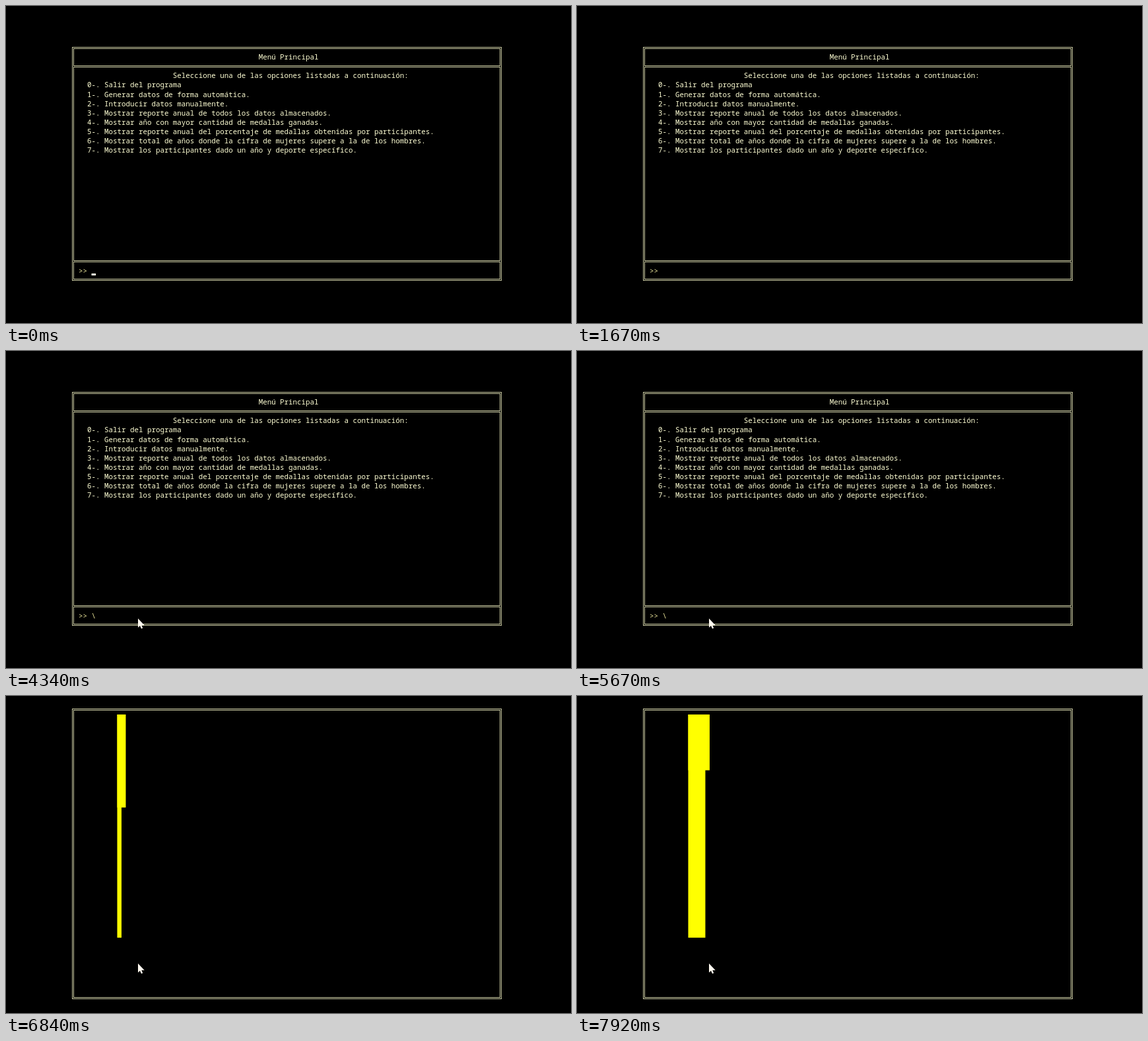
Animation of 856x480 px, one loop 8 s. Source, as an HTML page with a canvas:

```html
<!DOCTYPE html>
<html lang="es">
<head>
<meta charset="utf-8">
<title>Menú Principal</title>
<style>
  html, body { margin: 0; width: 100%; height: 100%; overflow: hidden; background: #000; }
  canvas { display: block; }
</style>
</head>
<body>
<canvas id="stage" width="856" height="480"></canvas>
<script>
const ctx = document.getElementById('stage').getContext('2d');

const LOOP = 8000, FRAMES = 96;
const CELL_W = 6.49, CELL_H = 14.08, LEFT = 97.1, TOP = 28;
const TEXT = '#ffffd4', PROMPT = '#ece69a', LINE = '#c8c8a0', BLOCK = '#ffff00', CURSOR = '#ffffe8';

// Moments in the session, in ms
const POINTER_AT = 3000, KEY_AT = 4250, CLEAR_AT = 6250, FILL_FRAME = 76;

const BLOCK_ROWS = 24, BLOCK_COL = 11;

const OPTIONS = [
  'Salir del programa',
  'Generar datos de forma automática.',
  'Introducir datos manualmente.',
  'Mostrar reporte anual de todos los datos almacenados.',
  'Mostrar año con mayor cantidad de medallas ganadas.',
  'Mostrar reporte anual del porcentaje de medallas obtenidas por participantes.',
  'Mostrar total de años donde la cifra de mujeres supere a la de los hombres.',
  'Mostrar los participantes dado un año y deporte específico.'
];

const cellX = col => LEFT + col * CELL_W;
const cellY = row => TOP + row * CELL_H;

// Terminal text: one glyph per grid cell
function print(col, row, text, color = TEXT) {
  ctx.fillStyle = color;
  const baseline = Math.round(cellY(row) + 11);
  [...text].forEach((glyph, i) => ctx.fillText(glyph, cellX(col + i), baseline));
}

function box(x1, y1, x2, y2) {
  ctx.strokeRect(x1 + 0.5, y1 + 0.5, x2 - x1, y2 - y1);
}

function drawMenu(t) {
  box(100, 62, 750, 415);
  box(102, 64, 748, 90);
  box(102, 92, 748, 385);
  box(102, 387, 748, 413);

  print(44, 3, 'Menú Principal');
  print(24, 5, 'Seleccione una de las opciones listadas a continuación:');
  OPTIONS.forEach((option, i) => print(4, 6 + i, `${i}-. ${option}`));

  const typed = t >= KEY_AT ? '\\' : '';
  print(2, 26, '>> ' + typed, PROMPT);
  if ((t / 980 + 0.085) % 1 < 0.5) {
    ctx.fillStyle = CURSOR;
    ctx.fillRect(cellX(5 + typed.length), 405, CELL_W, 3);
  }
}

function fillBlocks(cols, rows) {
  ctx.fillRect(cellX(BLOCK_COL), TOP, cols * CELL_W, rows * CELL_H);
}

function drawFill(frame) {
  box(100, 19, 750, 458);
  box(102, 21, 748, 456);

  const m = frame - FILL_FRAME;
  if (m < 0) return;
  // The filling slows very slightly as it goes
  const count = 1 + Math.round(5.59 * m - 0.0144 * m * m);
  const fullCols = Math.floor(count / BLOCK_ROWS);
  ctx.fillStyle = BLOCK;
  fillBlocks(fullCols, BLOCK_ROWS);
  fillBlocks(fullCols + 1, count % BLOCK_ROWS);
}

function drawPointer() {
  ctx.fillStyle = '#fffaf0';
  ctx.fill(new Path2D('M200 405V418.7L203 416L205 420.6L207.2 419.6L205.3 415.2H209.7Z'));
}

function draw(now) {
  const frame = Math.floor(now % LOOP * FRAMES / LOOP);
  const t = frame * LOOP / FRAMES;

  ctx.fillStyle = '#000';
  ctx.fillRect(0, 0, 856, 480);
  ctx.font = `500 ${CELL_W / 0.6}px "Noto Sans Mono", monospace`;
  ctx.strokeStyle = LINE;
  ctx.lineWidth = 1;

  if (t < CLEAR_AT) drawMenu(t);
  else drawFill(frame);
  if (t >= POINTER_AT) drawPointer();
}

const start = performance.now();
function tick() {
  draw(performance.now() - start);
  requestAnimationFrame(tick);
}
tick();
</script>
</body>
</html>
```
